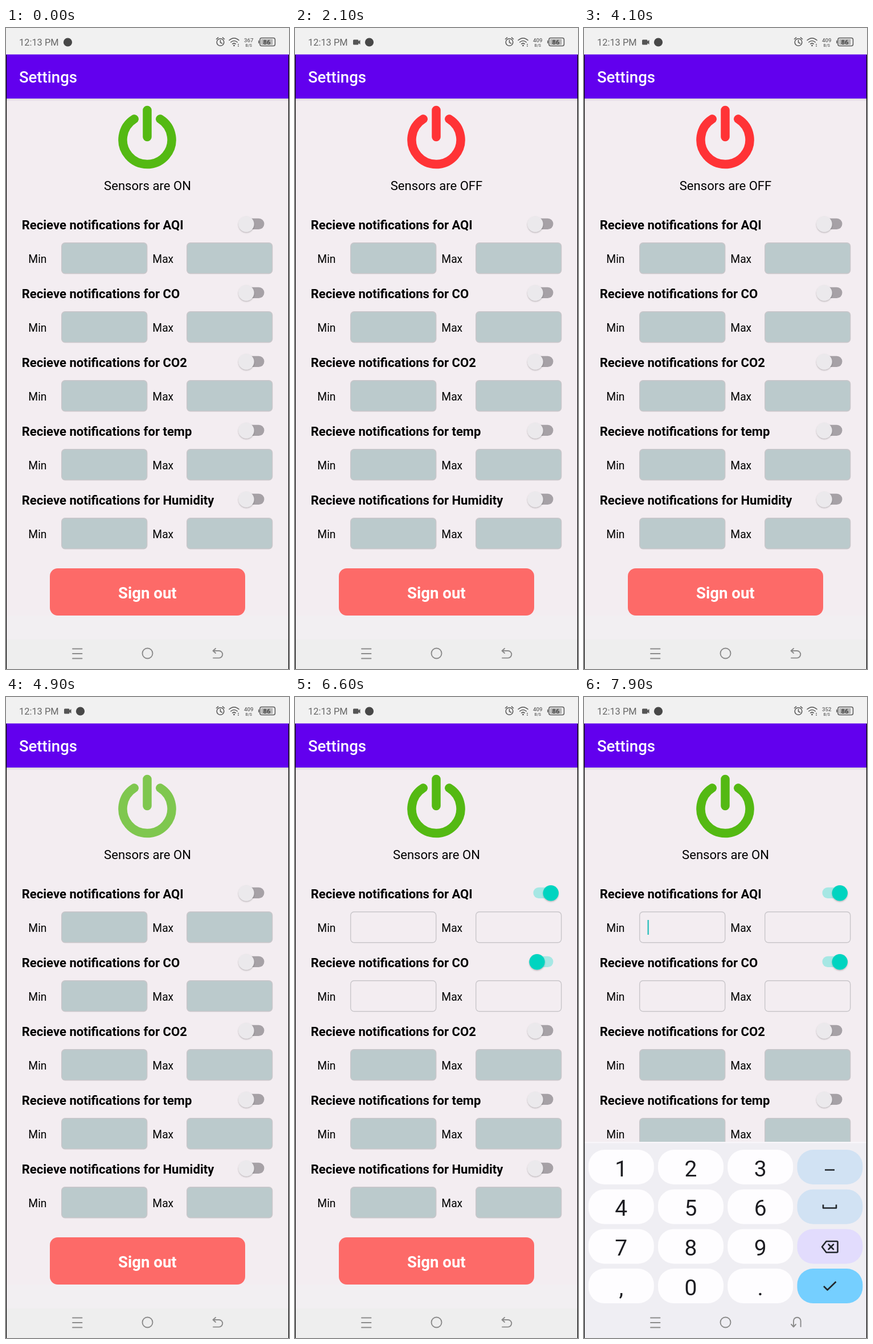
An HTML page for the animation above (8 s loop, 497 by 1127 pixels).

```html
<!DOCTYPE html>
<html lang="en">
<head>
<meta charset="utf-8">
<title>Settings</title>
<style>
html, body { margin: 0; width: 100%; height: 100%; overflow: hidden; background: #f3edf1; }
svg { display: block; width: 497px; height: 1127px; font-family: Roboto, sans-serif; }
.line { fill: none; stroke-linecap: round; stroke-linejoin: round; }
.mid { text-anchor: middle; }
</style>
</head>
<body>
<svg id="stage" viewBox="0 0 497 1127">
  <defs>
    <linearGradient id="fade" x2="0" y2="1">
      <stop stop-opacity=".1"/><stop offset="1" stop-opacity="0"/>
    </linearGradient>
    <filter id="shadow" x="-30%" y="-30%" width="160%" height="170%">
      <feDropShadow dx="0" dy="1.3" stdDeviation="1.1" flood-opacity=".28"/>
    </filter>
  </defs>
  <rect width="497" height="1127" fill="#f3edf1"/>
  <rect y="1033" width="497" height="42" fill="#f2eff2"/>
  <rect y="1075" width="497" height="52" fill="#eee"/>

  <g id="status" fill="#666">
    <rect width="497" height="47" fill="#f1f1f1"/>
    <text x="23" y="31" font-size="16.4">12:13 PM</text>
    <path id="camera" fill="#555" d="M103.500 20.500h6.500q1.500 0 1.500 1.500v1.500l3-2.500v8l-3-2.500v1.500q0 1.500-1.500 1.500h-6.500q-1.500 0-1.500-1.500v-6q0-1.500 1.500-1.500z"/>
    <circle id="badge" cy="25" r="7.600" fill="#484848"/>
    <g class="line" stroke="#5c5c5c" stroke-width="1.6">
      <circle cx="376.500" cy="25" r="6.300"/>
      <path d="M376.500 21.500V25.500L379.500 27M369.500 19.500l3-2.700M383.500 19.500l-3-2.700"/>
      <path d="M392 21.500q8.500-7.500 17 0M394.800 25q5.700-5 11.400 0M397.700 28q2.800-2.400 5.600 0"/>
      <rect x="446" y="17.500" width="26.500" height="14" rx="3"/>
      <path d="M443.800 22.500v4"/>
    </g>
    <circle cx="400.500" cy="30.800" r="1.500"/>
    <path d="M407 28h2v1.500h-2zM407 31h2v1.500h-2z"/>
    <g class="mid" font-weight="500">
      <text id="speed" x="426.300" y="25.300" font-size="9.800"></text>
      <text x="426.300" y="33" font-size="7">B/S</text>
      <rect x="448" y="19.500" width="20.500" height="10" rx="1" fill="#b5b5b5"/>
      <text x="458" y="29" font-size="11.500" fill="#444" font-weight="700">86</text>
    </g>
  </g>

  <rect y="124" width="497" height="5" fill="url(#fade)"/>
  <rect y="46.500" width="497" height="77.500" fill="#6200ee"/>
  <text x="22.900" y="96.200" font-size="27.600" font-weight="500" fill="#fff">Settings</text>

  <path id="power" class="line" stroke-width="15.500"
        d="M248 144.500V191.500M270.800 160A43 43 0 1 1 225.200 160"/>
  <text id="sensors" class="mid" x="248.500" y="284.700" font-size="22.100"></text>
  <g id="rows"></g>
  <rect x="77" y="950" width="343" height="83" rx="14" fill="#fd6a68"/>
  <text class="mid" x="248.300" y="1002.500" font-size="27.600" font-weight="700" fill="#fff">Sign out</text>
  <path id="caret" d="M112.700 392v26" stroke="#3fc4c1" stroke-width="2.600"/>

  <g id="keyboard">
    <rect y="782" width="497" height="345" fill="#f8f6fa"/>
    <rect y="784.500" width="497" height="343" fill="#efeef3"/>
    <g id="keys" class="mid" font-size="39" fill="#1d1d22"></g>
    <g class="line" stroke="#22262b" stroke-width="2.600">
      <path stroke-linecap="butt" d="M423 831.500h17M420 892.500v6h23v-6"/>
      <path d="M425.500 957h18.500q1.500 0 1.500 1.500v16.500q0 1.500-1.500 1.500h-18.500l-7.500-9.700zM429.500 962.500l8.500 8.500M438 962.500l-8.500 8.500"/>
      <path stroke-linecap="butt" d="M421 1036l6.500 6.500L442.500 1028"/>
    </g>
  </g>

  <g class="line" stroke="#8b8b8b" stroke-width="1.900">
    <path d="M117 1091.500h16.500M117 1100h16.500M117 1108.500h16.500"/>
    <circle cx="248.500" cy="1099.500" r="9"/>
    <path id="back" d="M368 1091l-4.500 4 4.500 4M364 1095h10a6.300 6.300 0 0 1 0 12.600h-10"/>
  </g>
  <path d="M.5 47V1127M496.500 47V1127" stroke="#000" stroke-width="1.300"/>
</svg>
<script>
const LOOP = 8000, STEP = 100;
const $ = id => document.getElementById(id);
const clamp = x => Math.min(1, Math.max(0, x));
const easeInOut = x => (1 - Math.cos(Math.PI * clamp(x))) / 2;
const easeOut = x => 1 - (1 - clamp(x)) ** 2;

// Taps on the power button: start and total fade time
const taps = [[1000, 400], [2300, 500], [3300, 400], [4700, 300]];
// Switch-on times; rows without one stay off
const labels = ['AQI', 'CO', 'CO2', 'temp', 'Humidity'];
const switchOn = [5646, 6546];

$('rows').innerHTML = labels.map((label, i) => `
  <g transform="translate(0 ${i * 121})">
    <text x="27.700" y="353.600" font-size="22.100" font-weight="700">Recieve notifications for ${label}</text>
    <g font-size="19.300"><text x="39.300" y="412.500">Min</text><text x="257.300" y="412.500">Max</text></g>
    <g class="fields" stroke="#c9c6ca" stroke-width="1.400">
      <rect x="97.700" y="377.700" width="150" height="54" rx="6"/>
      <rect x="317.700" y="377.700" width="150" height="54" rx="6"/>
    </g>
    <rect class="track" x="418.500" y="334.800" width="35" height="19.300" rx="9.600"/>
    <circle class="thumb" cy="344.700" r="13.700" filter="url(#shadow)"/>
  </g>`).join('');

const keyColors = ['#d1e2f3', '#d1e2f3', '#e2dcfd', '#75cfff'];
$('keys').innerHTML = ['123', '456', '789', ',0.'].map((chars, row) =>
  [0, 1, 2, 3].map(col => {
    const x = 7.8 + col * 122.2, y = 796 + row * 69.7;
    return `<rect x="${x}" y="${y}" width="115" height="61" rx="28" fill="${col < 3 ? '#fefdff' : keyColors[row]}"/>
      <text x="${x + 57.5}" y="${y + 46.5}">${chars[col] || ''}</text>`;
  }).join('')).join('');

const rows = [...$('rows').children].map(g =>
  ['.fields', '.track', '.thumb'].map(s => g.querySelector(s)));

function set(id, attrs) {
  for (const name in attrs) $(id).setAttribute(name, attrs[name]);
}

function drawPower(t) {
  let on = true, opacity = 1;
  for (const [start, length] of taps) {
    const dt = t - start;
    if (dt < 0) break;
    if (dt >= 100) on = !on;
    opacity = 0.2 + 0.8 * easeInOut((dt - 50) / (length - 50));
    if (dt < 100) opacity = 0.2;
  }
  set('power', { stroke: on ? '#54b913' : '#ff3336', opacity });
  $('sensors').textContent = 'Sensors are ' + (on ? 'ON' : 'OFF');
}

function drawRows(t) {
  rows.forEach(([fields, track, thumb], i) => {
    const dt = t - (switchOn[i] ?? Infinity), on = dt >= 0;
    fields.setAttribute('fill', on ? 'none' : '#bbcacc');
    track.setAttribute('fill', on ? '#a6e7e4' : '#a6a1a6');
    thumb.setAttribute('fill', on ? '#03d4c0' : '#ebe9ec');
    thumb.setAttribute('cx', 422 + 27.3 * easeInOut(dt / 250));
  });
}

function draw(t) {
  const recording = t >= 100, typing = t > 7600;
  set('camera', { visibility: recording ? 'visible' : 'hidden' });
  set('badge', { cx: recording ? 130.5 : 108.5 });
  $('speed').textContent = t < 1600 ? 367 : t < 6700 ? 409 : 352;
  drawPower(t);
  drawRows(t);
  set('caret', { visibility: t >= 7500 ? 'visible' : 'hidden' });
  set('keyboard', {
    visibility: typing ? 'visible' : 'hidden',
    transform: `translate(0 ${345 * (1 - easeOut((t - 7600) / 300))})`
  });
  set('back', { transform: typing ? 'rotate(-90 372 1099)' : '' });
}

function tick() {
  const t = performance.now() % LOOP;
  draw(Math.floor(t / STEP) * STEP);
  requestAnimationFrame(tick);
}
tick();
</script>
</body>
</html>
```
